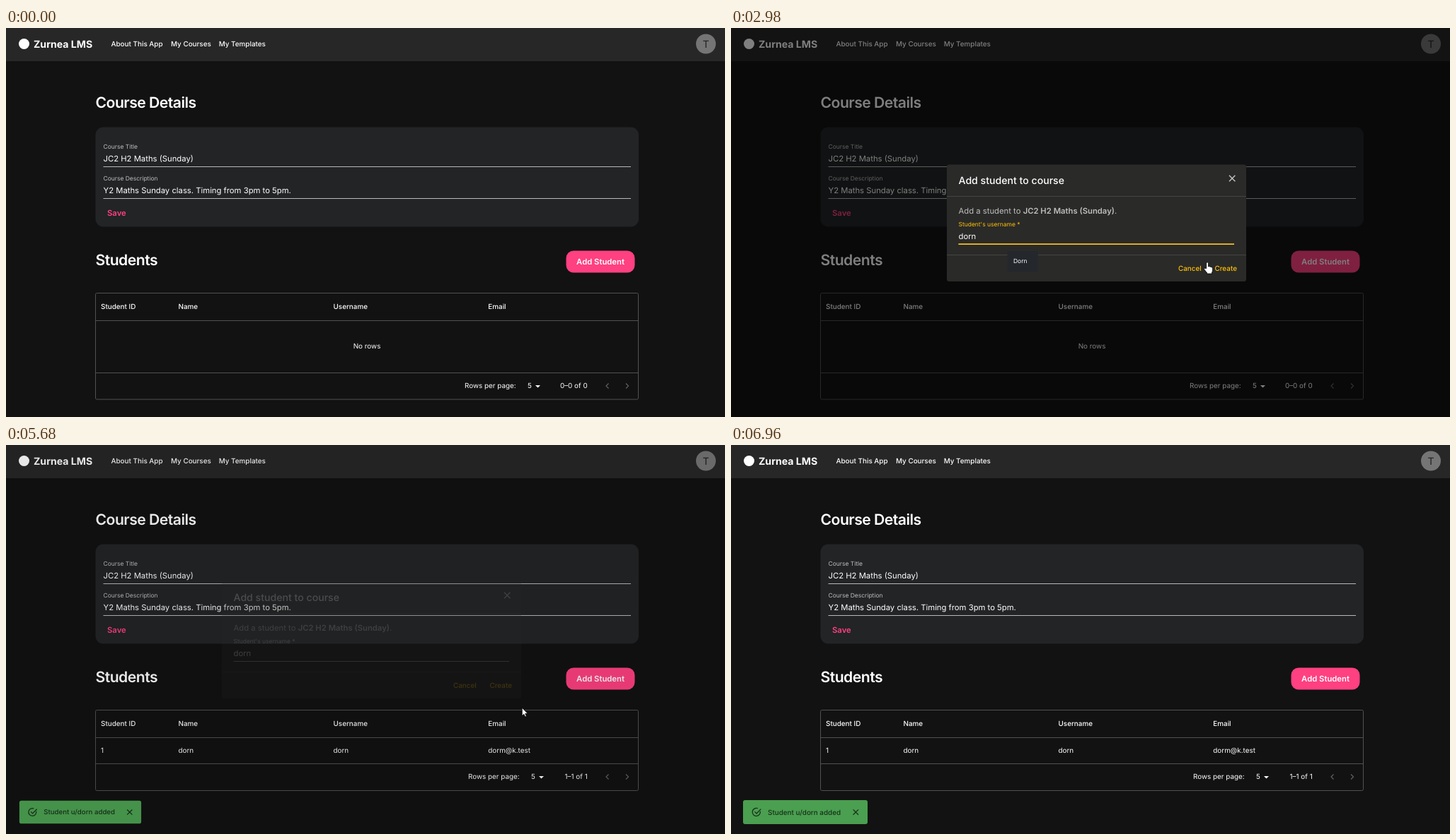
Recreate the animation shown at these times as an HTML page. Size 1016 by 551 pixels, loop 7.23 s.

```html
<!DOCTYPE html>
<html lang="en">
<head>
<meta charset="utf-8">
<title>Add a student</title>
<style>
  html, body { margin: 0; height: 100%; overflow: hidden; background: #121212; }
  svg { display: block; width: 100vw; height: 100vh; }
  text { font: 400 9.88px Inter, sans-serif; font-optical-sizing: none; fill: #fff;
         text-rendering: geometricPrecision; white-space: pre; }
  .h { font-size: 21.17px; font-weight: 600; letter-spacing: -.025em; }
  .xl { font-size: 14.11px; }
  .m { font-size: 11.29px; }
  .s { font-size: 8.47px; }
  .b { font-weight: 500; }
  .sb { font-weight: 600; }
  .bold { font-weight: 700; }
  .soft { fill: #bebebe; }
  .pink { fill: #ff4081; }
  .gold { fill: #ffc107; }
  .end { text-anchor: end; }
  .mid { text-anchor: middle; }
  .line { fill: none; stroke: #515151; }
  .rule { stroke: #b9b9ba; }
  #toast text { fill: #16301a; }
</style>
</head>
<body>
<svg viewBox="0 0 1016 551">
  <defs>
    <clipPath id="create"><rect x="677" y="327" width="44" height="27" rx="3"/></clipPath>
    <g id="pager">
      <path d="M748 506h7l-3.5 3.6z" fill="#fff"/>
    </g>
  </defs>
  <rect width="1016" height="551" fill="#121212"/>

  <rect width="1016" height="47" fill="#272727"/>
  <circle cx="25.5" cy="22.5" r="7.5" fill="#fff"/>
  <text class="xl bold" x="39" y="27.5">Zurnea LMS</text>
  <g class="nav">
    <text class="b" x="148.5" y="26.2">About This App</text>
    <text class="b" x="233" y="26.2">My Courses</text>
    <text class="b" x="300.7" y="26.2">My Templates</text>
  </g>
  <circle cx="989" cy="22.5" r="14" fill="#757575"/>
  <text class="xl mid" x="989" y="27.6" style="fill:#212121">T</text>

  <text class="h" x="126.5" y="112.9">Course Details</text>
  <rect x="126.5" y="140.5" width="767.5" height="141" rx="11" fill="#222426"/>
  <text class="s soft" x="137.5" y="171">Course Title</text>
  <text class="m" x="137.5" y="189.2">JC2 H2 Maths (Sunday)</text>
  <text class="s soft" x="137.5" y="216">Course Description</text>
  <text class="m" x="137.5" y="234.2">Y2 Maths Sunday class. Timing from 3pm to 5pm.</text>
  <path class="rule" d="M137.5 196.5H883M137.5 241.5H883"/>
  <text class="m sb pink" x="143" y="266.2">Save</text>

  <text class="h" x="126.5" y="335.9">Students</text>
  <rect id="add" x="791.5" y="315.5" width="97" height="31" rx="10.5"/>
  <text class="m sb mid" x="840" y="335.2">Add Student</text>

  <rect id="rowHover" x="127" y="415" width="766" height="36" fill="#fff" opacity=".08"/>
  <path class="line" d="M126.5 414.5H893.5"/>
  <text class="b" x="134" y="398">Student ID</text>
  <text class="b" x="243.5" y="398">Name</text>
  <text class="b" x="462.5" y="398">Username</text>
  <text class="b" x="681.3" y="398">Email</text>
  <g id="headHover">
    <path class="line" d="M236.5 389v11M455.5 389v11M674.5 389v11M892.5 389v11"/>
    <path d="M716 398.5v-8M712.3 394l3.7-3.7 3.7 3.7" fill="none" stroke="#777"/>
    <g fill="#fff"><circle cx="882.5" cy="390.7" r="1.3"/><circle cx="882.5" cy="394.5" r="1.3"/><circle cx="882.5" cy="398.3" r="1.3"/></g>
  </g>

  <g id="empty">
    <text class="mid" x="510" y="454.4">No rows</text>
    <text x="648" y="510.4">Rows per page:</text>
    <text x="737" y="510.4">5</text>
    <use href="#pager"/>
    <text class="end" x="821.7" y="510.4">0–0 of 0</text>
  </g>
  <g id="filled">
    <text x="134" y="436.4">1</text>
    <text x="243.5" y="436.4">dorn</text>
    <text x="462.5" y="436.4">dorn</text>
    <text x="681.3" y="436.4">dorm@k.test</text>
    <text x="653" y="473.4">Rows per page:</text>
    <text x="742" y="473.4">5</text>
    <use href="#pager" x="5" y="-37"/>
    <text class="end" x="821.7" y="473.4">1–1 of 1</text>
  </g>
  <rect id="frame" class="line" x="126.5" y="375.5" width="767" rx="2"/>
  <g id="foot">
    <path class="line" d="M126.5 488.5H893.5"/>
    <path d="M851.5 503.5l-3.5 3.5 3.5 3.5M876 503.5l3.5 3.5-3.5 3.5" fill="none" stroke="#606060" stroke-width="1.2"/>
  </g>

  <rect id="dim" width="1016" height="551"/>
  <g id="dialog">
    <rect x="305" y="193.5" width="423" height="165.5" rx="3" fill="#2a2a29"/>
    <text class="xl b" x="321.5" y="221">Add student to course</text>
    <path d="M704 208.8l8.4 8.4M712.4 208.8l-8.4 8.4" stroke="#c4c4c4" stroke-width="1.4"/>
    <path d="M305 238.5H728M305 321.5H728" stroke="#444443"/>
    <text class="m soft" x="321.5" y="263.2">Add a student to <tspan class="sb">JC2 H2 Maths (Sunday)</tspan>.</text>
    <text id="label" class="s" x="321.5" y="280.9">Student's username *</text>
    <text id="input" class="m" x="321.5" y="299.4"></text>
    <path class="rule" d="M321.5 306.5H711"/>
    <path id="focus" d="M-194.75 0H194.75" stroke="#ffc107" stroke-width="1.6"/>
    <circle id="ripple" cx="697" cy="340" fill="#ffc107" clip-path="url(#create)"/>
    <text class="b gold" x="632" y="343.6">Cancel</text>
    <text class="b gold" x="683.5" y="343.6">Create</text>
    <g id="hint">
      <rect x="390.5" y="316" width="43.5" height="29.5" rx="2" fill="#24272c"/>
      <text class="s" x="399" y="333">Dorn</text>
    </g>
  </g>

  <g id="toast">
    <rect x="-88" y="-17" width="176" height="34" rx="3" fill="#4b9f50"/>
    <path d="M-63.7 -1.2A5.6 5.6 0 1 1 -67.2 -5.3M-71.5 -.6l2.6 2.6 6.2-6.4" fill="none" stroke="#16301a" stroke-width="1.3"/>
    <text class="b" x="-53" y="3.5">Student u/dorn added</text>
    <path d="M67.6 -3.6l7.4 7.4M75 -3.6l-7.4 7.4" stroke="#16301a" stroke-width="1.3"/>
  </g>

  <g id="cursor" fill="#fff" stroke="#000" stroke-width=".8" stroke-linejoin="round">
    <path id="arrow" d="M0 0V11.6L2.6 9.2 4.4 13 6.2 12.2 4.5 8.4H8Z"/>
    <path id="hand" d="M-1.4 8.6V1.2A1.4 1.4 0 0 1 1.4 1.2V6Q3 5 4 6.3 5.5 5.8 6 7 7.4 6.6 7.5 8.2V11Q7.5 13 6.5 14V16H-.6V14.6Q-2.2 13-4.7 9.6-4.4 7.6-2.6 8.4Z"/>
  </g>
</svg>
<script>
const LOOP = 7230;
const el = {};
document.querySelectorAll('[id]').forEach(e => el[e.id] = e);

const part = (t, start, length) => Math.min(1, Math.max(0, (t - start) / length));
const smooth = p => p * p * (3 - 2 * p);
const easeOut = p => p * (2 - p);
const ramp = (t, start, length) => smooth(part(t, start, length));
const show = (e, on) => e.style.display = on ? '' : 'none';
const set = (e, attrs) => { for (const k in attrs) e.setAttribute(k, attrs[k]); };

// pointer stops: time, x, y, easing towards the stop
const stops = [
  [110, 957, 524], [830, 855, 338, easeOut], [1020, 855, 338, easeOut],
  [1370, 576, 270, easeOut], [2700, 576, 270, easeOut], [2980, 673, 332, smooth],
  [3380, 697, 337, easeOut], [5530, 697, 337, easeOut], [6070, 764, 410, easeOut],
  [6960, 972, 562, smooth]
];
const keys = [1890, 2030, 2220, 2370];

function pointer(t) {
  const i = Math.max(1, stops.findIndex(s => s[0] > t));
  const [t0, x0, y0] = stops[i - 1], [t1, x1, y1, ease] = stops[i];
  const p = ease(part(t, t0, t1 - t0));
  return [x0 + (x1 - x0) * p, y0 + (y1 - y0) * p];
}

function draw(t) {
  const visible = t >= 110 && t < 6950;
  const [x, y] = pointer(t);
  const open = ramp(t, 900, 225) - ramp(t, 5540, 195);
  const filled = t >= 5680;
  const free = visible && (t < 900 || t >= 5640);
  const inTable = free && x < 893;
  const onHead = inTable && y > 375 && y < 414.5;
  const onCreate = t > 2800 && t < 5640 && y > 327;
  const focused = t < 3300;

  set(el.add, { fill: t < 1040 && visible && y < 346 ? '#f5176a' : '#ff4081' });
  show(el.headHover, onHead);
  show(el.rowHover, inTable && filled && y >= 414.5 && y < 451);
  show(el.empty, !filled);
  show(el.filled, filled);
  set(el.frame, { height: filled ? 114 : 150.5 });
  set(el.foot, { transform: `translate(0 ${filled ? -37 : 0})` });

  set(el.dim, { opacity: open / 2 });
  set(el.dialog, { opacity: open });
  show(el.dialog, open > 0);
  el.input.textContent = 'dorn'.slice(0, keys.filter(k => t >= k).length);
  el.label.style.fill = focused ? '#ffc107' : '#c8c8c8';
  const focus = ramp(t, 950, 200) - ramp(t, 3300, 80);
  set(el.focus, { transform: `translate(516.25 306) scale(${focus} 1)` });
  show(el.focus, focus > 0);
  show(el.hint, t >= 1960 && focused);
  set(el.ripple, { r: 28 * ramp(t, 3400, 400), opacity: .3 * (1 - ramp(t, 3650, 450)) });

  const grow = ramp(t, 5505, 215);
  set(el.toast, {
    opacity: grow,
    transform: `translate(105 520) scale(${.75 + .25 * grow} ${.5625 + .4375 * grow})`
  });

  const hand = onHead || onCreate || (t >= 900 && t < 1040);
  show(el.cursor, visible);
  show(el.hand, hand);
  show(el.arrow, !hand);
  set(el.cursor, { transform: `translate(${x} ${y})` });
}

function tick() {
  draw(performance.now() % LOOP);
  requestAnimationFrame(tick);
}
tick();
</script>
</body>
</html>
```
